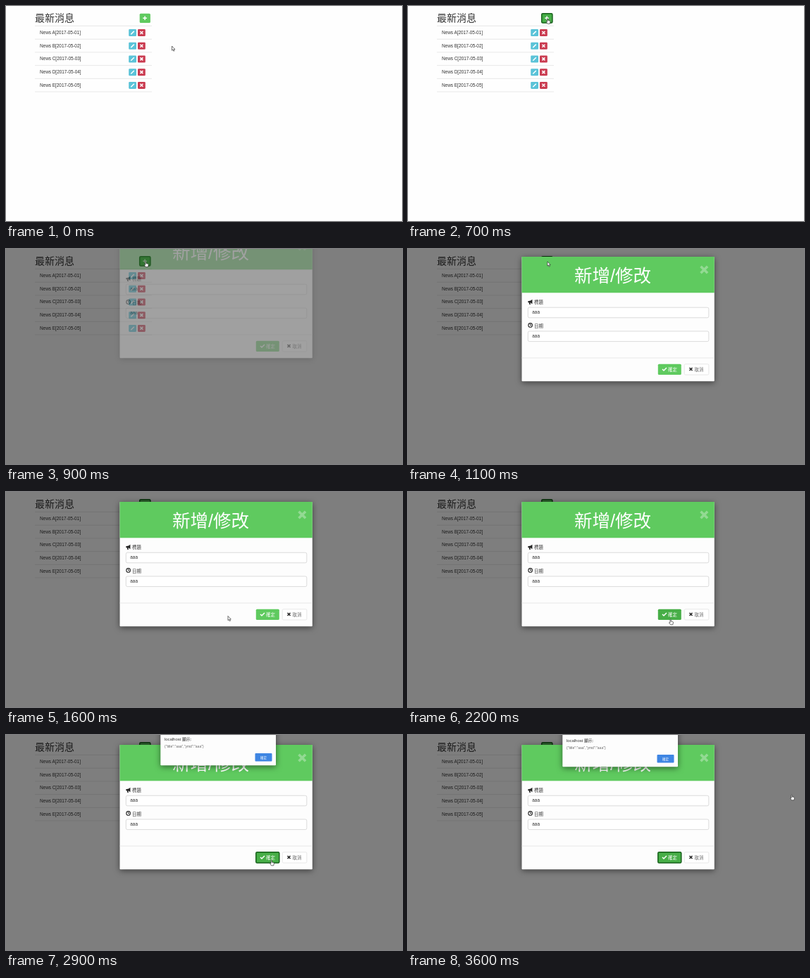
These frames come from a looping animation (562x306 px, 3700 ms). An HTML page:

```html
<!DOCTYPE html>
<html lang="zh-Hant">
<head>
<meta charset="utf-8">
<title>最新消息</title>
<style>
html, body { margin: 0; width: 100%; height: 100%; overflow: hidden; background: #fefefe; }
svg { display: block; width: 562px; height: 306px; }
text { font: 6.4px "Liberation Sans", "Noto Sans CJK TC", "Noto Sans CJK", sans-serif; fill: #333; }
.title { font-size: 14px; font-weight: 300; }
.big { font-size: 25.5px; fill: #fff; }
.label { font-weight: 500; }
.line { stroke: #e2e2e2; stroke-width: .8; fill: none; }
.icon { fill: none; stroke: #fff; stroke-width: 1.5; }
.dark { stroke: #222; }
.green { fill: #5fca5f; }
.green.hover { fill: #47ae47; }
.green.focus { stroke: #17601b; stroke-width: 1.5; }
.field { fill: #fff; stroke: #d2d2d2; stroke-width: .8; }
.shadow { filter: drop-shadow(0 2px 4px rgba(0, 0, 0, .5)); }
</style>
</head>
<body>
<svg viewBox="0 0 562 306">
  <defs>
    <path id="cross" d="M-2-2L2 2M2-2L-2 2"/>
    <path id="check" d="M-3 0L-1 2L3-2"/>
  </defs>

  <text class="title" x="41" y="22">最新消息</text>
  <rect id="add" class="green" x="189.7" y="10.7" width="15.2" height="13.2" rx="1.5"/>
  <path class="icon" d="M194.3 17.3h5.6M197.1 14.5v5.6"/>
  <path class="line" d="M41 28.3H207"/>
  <g id="rows"></g>

  <rect id="shade" width="562" height="306"/>

  <g id="modal">
    <rect class="shadow" x="161.5" width="273.3" height="177.3" rx="1" fill="#fdfdfd"/>
    <rect class="green" x="161.5" width="273.3" height="51.3"/>
    <text class="big" x="290.5" y="35.5" text-anchor="middle">新增/修改</text>
    <use href="#cross" transform="translate(420.3 18.5) scale(2.4)" class="icon" style="stroke:#93da93"/>

    <path d="M170.3 63.2L174 62.6L176.4 60.8V67.2L174 65.6L173.3 65.5L174 68H172.3L171.6 65.3L170.3 65Z" fill="#222"/>
    <text class="label" x="179" y="67">標題</text>
    <rect class="field" x="170.3" y="72.2" width="256.5" height="14.6" rx="2"/>
    <text x="176.3" y="81.3">aaa</text>

    <circle cx="173.6" cy="97.4" r="2.8" class="icon dark" style="stroke-width:1.1"/>
    <path d="M173.6 95.6V97.7H175" class="icon dark" style="stroke-width:.9"/>
    <text class="label" x="179" y="100.6">日期</text>
    <rect class="field" x="170.3" y="106" width="256.5" height="14.6" rx="2"/>
    <text x="176.3" y="115.1">aaa</text>

    <path class="line" d="M161.5 144H434.8"/>
    <rect id="ok" class="green" x="354.8" y="152.8" width="33" height="15.2" rx="1.5"/>
    <use href="#check" x="364" y="160" class="icon"/>
    <text x="369" y="162.8" style="fill:#fff">確定</text>
    <rect class="field" x="392.3" y="152.8" width="34.5" height="15.2" rx="1.5" style="stroke:#e2e2e2"/>
    <use href="#cross" x="401.5" y="160" class="icon dark"/>
    <text x="406.5" y="162.8" style="fill:#666">取消</text>
  </g>

  <g id="alert">
    <rect class="shadow" x="219.3" y="-20" width="163.7" height="65.3" rx="1" fill="#fdfdfd"/>
    <text x="225" y="10.3" style="font-size:5.9px">localhost 顯示:</text>
    <text x="225" y="20" style="font-size:5px;fill:#666">{"title":"aaa","ymd":"aaa"}</text>
    <rect x="353.5" y="28" width="24" height="11.6" rx="1" fill="#3f86e3"/>
    <text x="365.5" y="35.6" text-anchor="middle" style="font-size:4.6px;fill:#fff">確定</text>
  </g>

  <g id="cursor" fill="#fff" stroke="#333" stroke-width=".7" stroke-linejoin="round">
    <path id="arrow" d="M0 0V6.2L1.4 5L2.4 7.2L3.5 6.7L2.5 4.6H4.3Z"/>
    <path id="hand" d="M0 .5Q.7-.3 1.2.5V3L3.6 3.4Q4.6 3.7 4.4 5L3.8 7.8H.5L-1.5 4.9Q-1.3 4 0 4.9Z"/>
  </g>
</svg>
<script>
const $ = id => document.getElementById(id);

$('rows').innerHTML = [...'ABCDE'].map((c, i) => `
  <g transform="translate(0 ${38 + 18.7 * i})">
    <text x="48" y="2">News ${c}[2017-05-0${i + 1}]</text>
    <rect x="174.2" y="-4.9" width="10.8" height="10" rx="1.3" fill="#5bc3d8"/>
    <path class="icon" d="M177.3 2.4L181.8-2.1"/>
    <rect x="187" y="-4.9" width="10.8" height="10" rx="1.3" fill="#ca3b50"/>
    <use href="#cross" x="192.4" class="icon"/>
    <path class="line" d="M41 9.2H207"/>
  </g>`).join('');

// Each key is [time, value, ...]; values are joined linearly.
function at(keys, t) {
  const i = keys.findIndex(k => k[0] > t);
  if (i < 0) return keys[keys.length - 1].slice(1);
  if (!i) return keys[0].slice(1);
  const a = keys[i - 1], b = keys[i], p = (t - a[0]) / (b[0] - a[0]);
  return a.slice(1).map((v, j) => v + (b[j + 1] - v) * p);
}

const path = [
  [0, 235.5, 57], [100, 234, 55], [300, 214, 34], [500, 198, 19], [700, 197.5, 17.5],
  [1200, 198, 18], [1300, 212, 40], [1500, 285, 148], [1700, 345, 205], [1900, 368, 188],
  [2200, 372, 181], [2500, 376, 178], [3000, 376, 178], [3100, 390, 172],
  [3300, 470, 126], [3500, 537, 90], [3600, 544, 85]
];
const shade = [[700, 0], [800, .28], [900, .5]];
const modal = [[800, -30, 0], [900, -22, .27], [1000, 0, .85], [1100, 11, 1], [1200, 14, 1]];
const alertDrop = [[2600, -48], [2700, -26], [2800, -9], [2900, -2], [3000, 0]];

function draw(t) {
  const [x, y] = at(path, t), [top, alpha] = at(modal, t);
  const overAdd = t >= 500 && t < 1000, overOk = t >= 2000;
  const hand = overAdd || overOk;
  $('cursor').setAttribute('transform', `translate(${x} ${y})`);
  $('hand').style.display = hand ? '' : 'none';
  $('arrow').style.display = hand ? 'none' : '';
  $('add').setAttribute('class', 'green' + (overAdd ? ' hover' : '') + (t >= 700 ? ' focus' : ''));
  $('ok').setAttribute('class', 'green' + (overOk ? ' hover' : '') + (t >= 2600 ? ' focus' : ''));
  $('shade').setAttribute('opacity', at(shade, t)[0]);
  $('modal').setAttribute('transform', `translate(0 ${top})`);
  $('modal').setAttribute('opacity', alpha);
  $('alert').setAttribute('transform', `translate(0 ${at(alertDrop, t)[0]})`);
  $('alert').style.display = t > 2600 ? '' : 'none';
}

function tick() {
  draw(Math.floor(performance.now() % 3700 / 100) * 100);
  requestAnimationFrame(tick);
}
tick();
</script>
</body>
</html>
```
